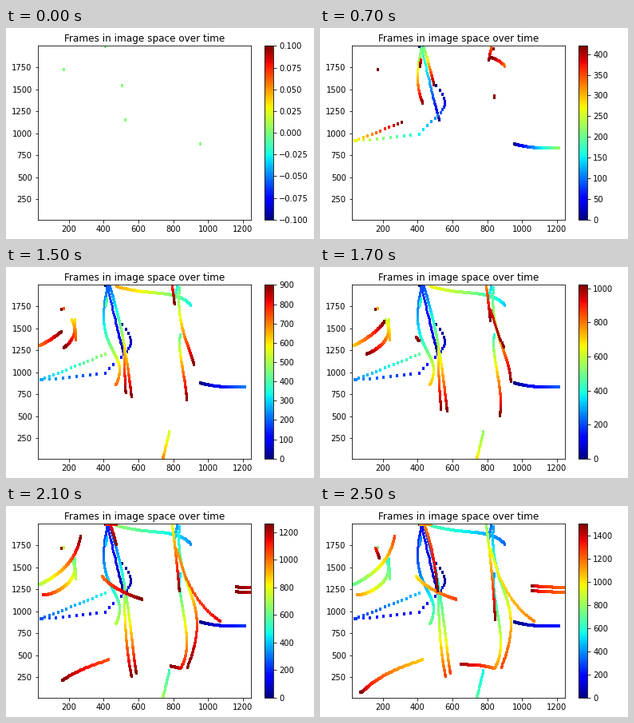
Recreate the animation shown at these times as a matplotlib script. Size 386 px wide and 264 px high, loop 2.6 s.

```python
import matplotlib.pyplot as plt
import numpy as np
from matplotlib.animation import FuncAnimation
from matplotlib.cm import ScalarMappable
from matplotlib.collections import PolyCollection
from matplotlib.transforms import Affine2D

WIDTH, HEIGHT, DPI = 386, 264, 72
FRAMES, INTERVAL = 26, 100
TICKS_PER_FRAME = 60   # video frames revealed by each step
CELL_W, CELL_H = 3, 4

plt.rcParams.update({"font.family": "DejaVu Sans", "font.size": 10})
fig = plt.figure(figsize=((WIDTH + 1e-3) / DPI, (HEIGHT + 1e-3) / DPI),
                 dpi=DPI, facecolor="white")


def add_axes(left, width):
    return fig.add_axes([left / WIDTH, 24.19 / HEIGHT,
                         width / WIDTH, 217.44 / HEIGHT])


ax = add_axes(39.65, 267.84)
ax.set(xlim=(20, 1250), ylim=(20, 1995),
       xticks=range(200, 1201, 200), yticks=range(250, 1751, 250))
ax.set_title("Frames in image space over time", fontsize=12, pad=5)

mapper = ScalarMappable(cmap="jet")
mapper.set_clim(-0.1, 0.1)
fig.colorbar(mapper, cax=add_axes(324.23, 10.87))

marks = []


def track(begin, end, *keys, step=6):
    """Mark a smooth polynomial path through keys evenly spaced in time.

    Keys are (x, y) in pixels from the top left.
    """
    times = np.arange(begin, end + 1, step)
    progress = (times - begin) / (end - begin)
    curve = np.polyfit(np.linspace(0, 1, len(keys)), keys, len(keys) - 1)
    powers = np.vander(progress, len(keys))
    marks.extend((t, x, y) for t, (x, y) in zip(times, powers @ curve))


# Long bundle, upper left to lower middle
track(0, 18, (124, 23), (128, 23))
track(0, 195, (149, 115), (140, 80), (127, 25))
track(200, 720, (127, 24), (125, 84), (139, 115), (137, 148))
track(200, 1260, (130, 25), (148, 99), (157, 163), (163, 209))
track(384, 420, (126, 40), (125, 48))
track(600, 1260, (148, 100), (150, 162), (157, 213))
track(990, 1260, (120, 88), (141, 104), (170, 116))
track(1080, 1140, (125, 23), (138, 23))
track(1150, 1500, (131, 25), (141, 62), (147, 106))

# Fast swing out to the left edge and back
track(0, 155, (145, 72), (156, 94), (146, 110), (123, 133), step=11)
track(166, 265, (113, 134), (43, 141), step=12)
track(265, 485, (43, 141), (128, 107), step=14)

# Far left
track(0, 740, (72, 52))
track(750, 1300, (69.5, 52.5))
track(1310, 1500, (70, 54), (74, 65))
track(600, 740, (86, 66), (87, 91))
track(600, 1120, (82, 66), (83, 88), (67, 104), (46, 111))
track(700, 1260, (41, 98), (77, 72), (93, 37))
track(1040, 1500, (128, 192), (81, 211), (59, 226), (50, 233))

# Right half
track(0, 225, (243, 144.5), (268, 149), (300, 149))
track(330, 660, (231, 47), (209, 35), (178, 31), (138, 24))
track(340, 420, (214, 25), (211, 40))
track(400, 1140, (218, 84), (220, 122), (226, 165), (218, 203))
track(420, 1260, (217, 25), (224, 88), (238, 135), (227, 201))
track(540, 690, (204, 206), (199, 228), (196, 239))
track(780, 1500, (208, 24), (215, 86), (219, 141))
track(930, 1160, (214, 55), (236, 110), (269, 144))
track(1150, 1450, (218, 203), (200, 199), (176, 198))
for y in (100, 106):
    track(1190, 1500, (306, y + 2), (272, y), (266, y))

times, xs, ys = np.array(sorted(marks)).T
lefts = np.round(xs - CELL_W / 2 + 0.5)
bottoms = HEIGHT - np.round(ys - CELL_H / 2 + 0.5) - CELL_H
corners = np.array([(0, 0), (CELL_W, 0), (CELL_W, CELL_H), (0, CELL_H)])
cells = np.stack([lefts, bottoms], axis=1)[:, None] + corners

cloud = PolyCollection([], linewidths=0, antialiaseds=False,
                       transform=Affine2D().scale(1 / DPI) + fig.dpi_scale_trans)
ax.add_collection(cloud, autolim=False)


def update(index):
    latest = index * TICKS_PER_FRAME
    mapper.set_clim(*((0, latest) if latest else (-0.1, 0.1)))
    seen = times <= latest
    cloud.set_verts(cells[seen])
    cloud.set_facecolor(mapper.to_rgba(times[seen]))
    return [cloud]


animation = FuncAnimation(fig, update, frames=FRAMES, interval=INTERVAL,
                          init_func=lambda: update(0), repeat=True,
                          repeat_delay=0, blit=False)
plt.show()
```
